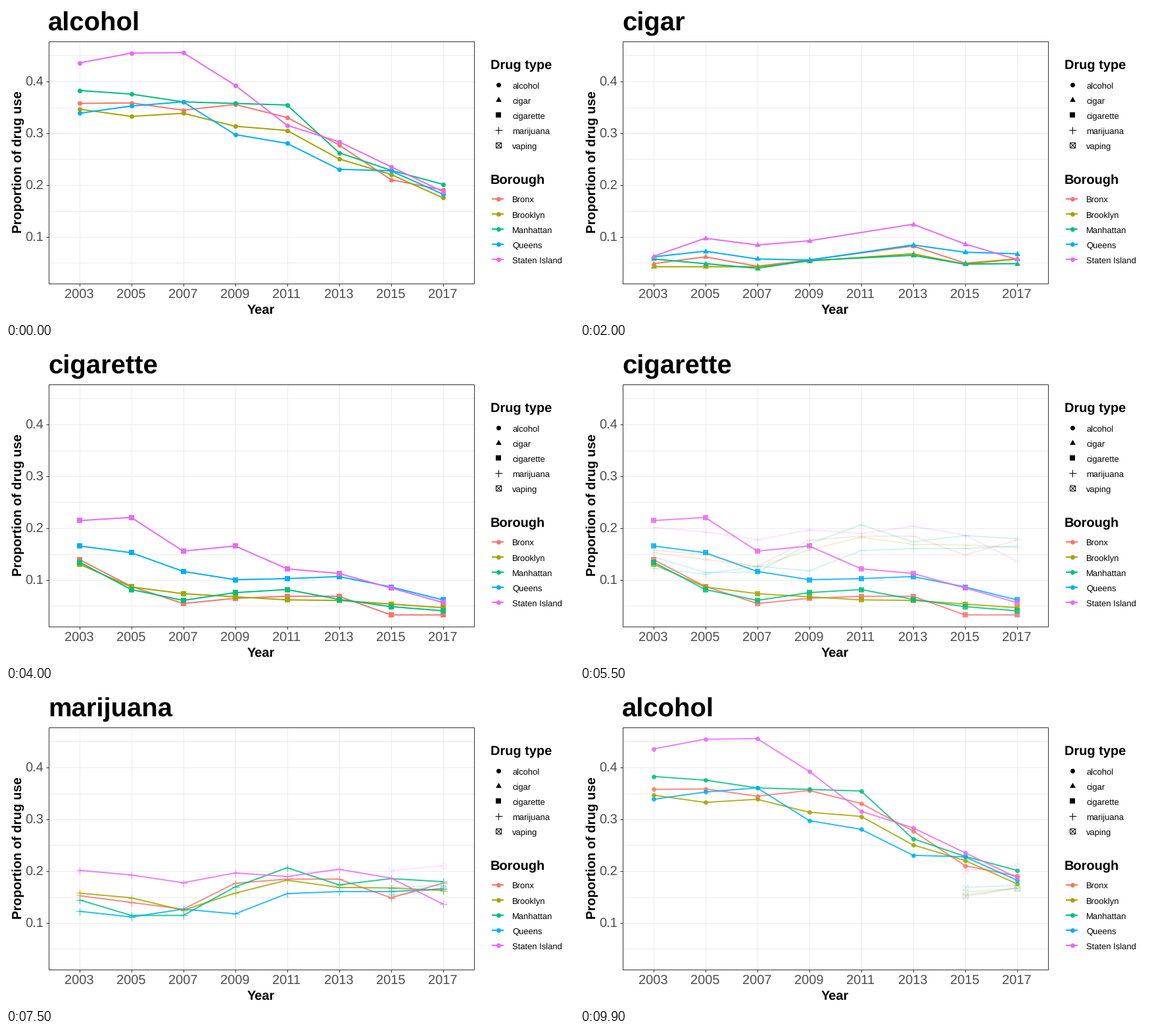
A matplotlib script for the animation above (10000 ms loop, 864x480 px).

```python
import matplotlib.pyplot as plt
from matplotlib.animation import FuncAnimation
from matplotlib.patches import Rectangle
from matplotlib.path import Path

W, H, DPI = 864, 480, 100
PX = 72 / DPI  # points per pixel
HOLD, STEPS = 14, 6
PERIOD = HOLD + STEPS

plt.rcParams["font.family"] = "Liberation Sans"
plt.rcParams["text.hinting"] = "none"

YEARS = list(range(2003, 2018, 2))
BOROUGHS = {
    "Bronx": "#F8766D",
    "Brooklyn": "#A3A500",
    "Manhattan": "#00BF7D",
    "Queens": "#00B0F6",
    "Staten Island": "#E76BF3",
}

# Proportions in thousandths, one row per borough
alcohol = [
    [357, 358, 344, 355, 330, 277, 210, 190],
    [346, 332, 338, 313, 305, 250, 220, 175],
    [382, 375, 360, 357, 354, 262, 228, 201],
    [338, 352, 360, 297, 280, 230, 227, 182],
    [435, 454, 455, 392, 315, 283, 235, 187],
]
cigar = [
    [48, 61, 43, 55, 82, 49, 57],
    [42, 42, 42, 53, 67, 47, 57],
    [57, 48, 39, 54, 64, 47, 48],
    [61, 72, 57, 55, 84, 70, 67],
    [62, 97, 84, 92, 124, 86, 56],
]
cigarette = [
    [139, 87, 54, 64, 68, 68, 32, 32],
    [130, 86, 73, 67, 61, 60, 53, 46],
    [134, 81, 60, 75, 81, 62, 48, 40],
    [165, 152, 116, 100, 102, 106, 86, 61],
    [214, 220, 155, 165, 121, 112, 84, 56],
]
marijuana = [
    [152, 139, 126, 176, 184, 184, 148, 176],
    [157, 148, 124, 157, 182, 168, 167, 162],
    [144, 114, 114, 169, 206, 173, 185, 179],
    [122, 111, 126, 117, 156, 160, 160, 165],
    [201, 192, 177, 196, 189, 203, 186, 136],
]
vaping = [[150, 167], [159, 166], [153, 167], [168, 172], [200, 210]]

TRIANGLE = Path([(0, 5.1), (4.4, -2.6), (-4.4, -2.6), (0, 5.1)], closed=True)
BOXED_X = Path(
    [(-1, -1), (1, -1), (1, 1), (-1, 1), (-1, -1), (-1, -1), (1, 1), (-1, 1), (1, -1)],
    [1, 2, 2, 2, 79, 1, 2, 1, 2],
)

# name: (rows, years, marker, marker size in px, filled)
DRUGS = {
    "alcohol": (alcohol, YEARS, "o", 7, True),
    "cigar": (cigar, [y for y in YEARS if y != 2011], TRIANGLE, 10.2, True),
    "cigarette": (cigarette, YEARS, "s", 8, True),
    "marijuana": (marijuana, YEARS, "+", 11, False),
    "vaping": (vaping, [2015, 2017], BOXED_X, 8, False),
}
NAMES = list(DRUGS)

fig = plt.figure(figsize=(W / DPI, H / DPI), dpi=DPI, facecolor="white")
ax = fig.add_axes([0, 0, 1, 1])
ax.set_xlim(0, W)
ax.set_ylim(H, 0)
ax.axis("off")


def year_x(year):
    return 111.5 + 39.5 * (year - 2003)


def value_y(value):
    return 430.5 - 790 * value


def line(xs, ys, color, width=1, z=1):
    return ax.plot(xs, ys, color=color, lw=width * PX, zorder=z,
                   solid_capstyle="butt", solid_joinstyle="round")[0]


def points(xs, ys, color, marker, size, filled, z=5):
    return ax.plot(xs, ys, ls="none", marker=marker, ms=size * PX, color=color,
                   mfc=color if filled else "none", mew=0 if filled else PX,
                   zorder=z)[0]


def label(x, y, text, size, color="black", **kw):
    return ax.text(x, y, text, fontsize=size * PX, color=color,
                   va="baseline", **kw)


def draw_panel():
    left, right, top, bottom = 64.5, 711.5, 53.5, 422.5
    for i in range(1, 10):
        y = value_y(i / 20)
        line([left, right], [round(y - 0.5) + 0.5] * 2, "#EBEBEB")
    for year in YEARS:
        x = year_x(year)
        line([x, x], [top, bottom], "#EBEBEB")
        line([x, x], [bottom, bottom + 4], "#333333", z=8)
        label(x - 0.5, 446, str(year), 20, "#4D4D4D", ha="center")
    for i in range(1, 5):
        y = value_y(i / 10)
        line([left - 4, left], [y, y], "#333333", z=8)
        label(57, y + 7.5, f"0.{i}", 20, "#4D4D4D", ha="right")
    ax.add_patch(Rectangle((left, top), right - left, bottom - top, fill=False,
                           ec="#333333", lw=PX, zorder=8))
    label(387.5, 469, "Year", 20, weight="bold", ha="center")
    label(24, 237.5, "Proportion of drug use", 20, weight="bold", ha="center",
          rotation=90, rotation_mode="anchor")


def draw_legends():
    label(737, 97, "Drug type", 20, weight="bold")
    for i, (name, (_, _, marker, size, filled)) in enumerate(DRUGS.items()):
        y = 119.5 + 23 * i
        points([748.5], [y], "black", marker, size, filled)
        label(770, y + 6.5, name, 13)
    label(737, 271, "Borough", 20, weight="bold")
    for i, (name, color) in enumerate(BOROUGHS.items()):
        y = 293.5 + 23 * i
        line([739, 757], [y, y], color, 2)
        points([748.5], [y], color, "o", 7, True)
        label(770, y + 6.5, name, 13)


def draw_series(rows, years, marker, size, filled):
    xs = [year_x(year) for year in years]
    artists = []
    for row, color in zip(rows, BOROUGHS.values()):
        ys = [value_y(v / 1000) for v in row]
        artists.append(line(xs, ys, color, 2, z=3))
        artists.append(points(xs, ys, color, marker, size, filled))
    return artists


draw_panel()
draw_legends()
title = label(64, 38, "", 40, weight="bold")
series = [draw_series(*spec) for spec in DRUGS.values()]


def update(frame):
    state, tick = divmod(frame, PERIOD)
    following = (state + 1) % len(NAMES)
    step = max(0, tick - HOLD)
    fade = step / STEPS
    for i, artists in enumerate(series):
        alpha = {state: 1 - fade, following: fade}.get(i, 0)
        for artist in artists:
            artist.set_alpha(alpha)
            artist.set_visible(alpha > 0)
    title.set_text(NAMES[following if step > STEPS / 2 else state])
    return [title]


anim = FuncAnimation(fig, update, frames=PERIOD * len(NAMES), interval=100,
                     repeat=True, repeat_delay=0, blit=False)
plt.show()
```
